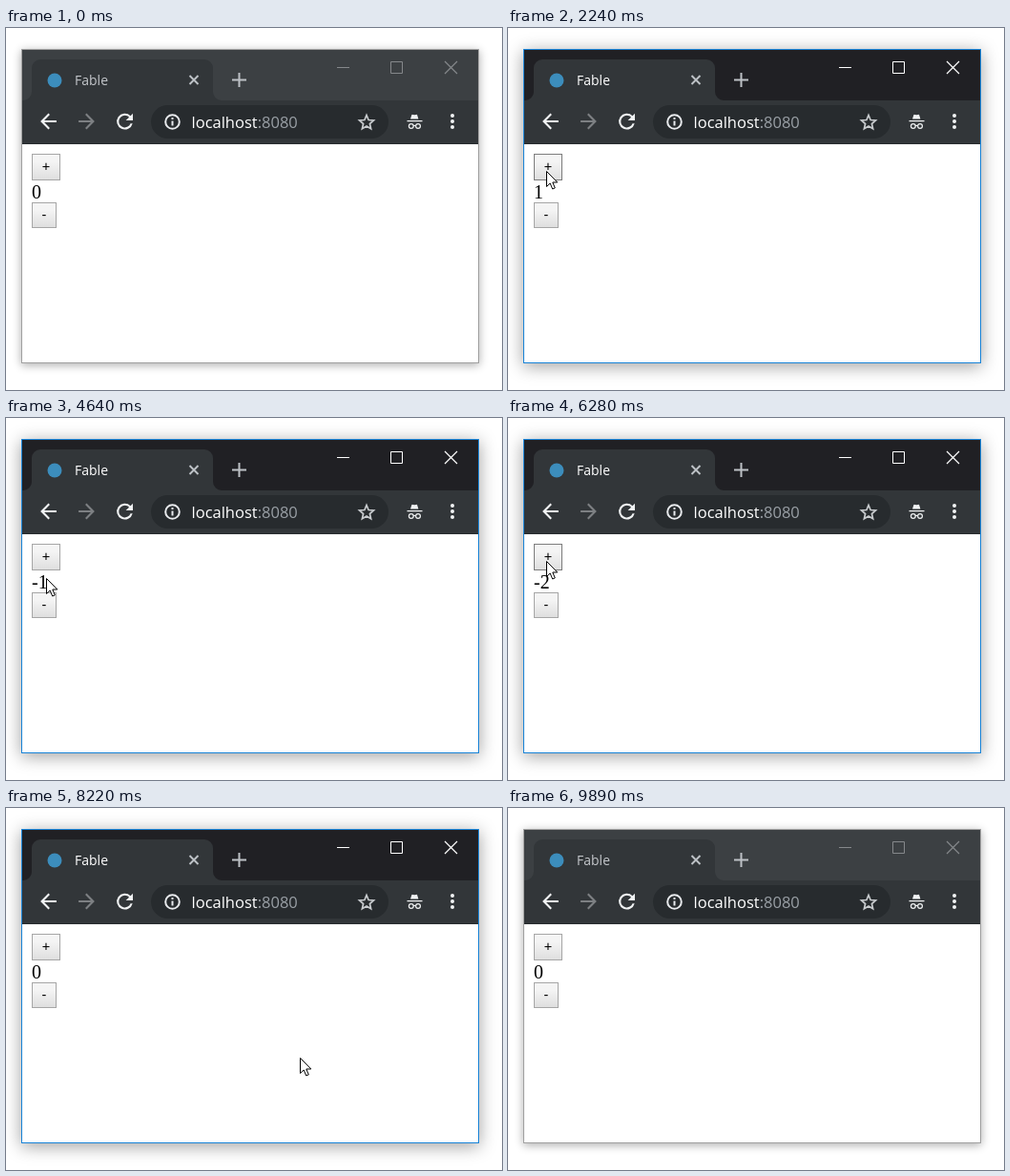
An HTML page for the animation above (9990 ms loop, 520 px wide and 380 px high).

```html
<!DOCTYPE html>
<html lang="en">
<head>
<meta charset="utf-8">
<title>Counter</title>
<style>
html, body { margin: 0; width: 100%; height: 100%; overflow: hidden; background: #fff; }
body { --frame: #3c4043; --edge: #a0a0a0; --ctl: #85888b; --label: #c3c6ca; --shadow: 0 2px 9px rgba(0,0,0,.33); }
body.active { --frame: #202024; --edge: #1883d7; --ctl: #fff; --label: #fff; --shadow: 0 3px 17px rgba(0,0,0,.38); }
#shadow { position: absolute; left: 16px; top: 22px; width: 480px; height: 330px; box-shadow: var(--shadow); }
svg { position: absolute; left: 0; top: 0; }
.ui { font-family: "Open Sans", "Noto Sans", sans-serif; }
.line { fill: none; stroke-width: 2; }
.thin { fill: none; stroke-width: 1.2; }
.button rect { fill: url(#face); stroke: #a6a6a6; }
.button.hover rect { stroke: #7c7c7c; }
.button.pressed rect { fill: #e2e2e2; }
.button text { font: 14.5px Arial, "Liberation Sans", sans-serif; text-anchor: middle; }
#count { font: 20px "Times New Roman", "Liberation Serif", serif; }
.cursor { fill: #fff; stroke: #000; }
</style>
</head>
<body>
<div id="shadow"></div>
<svg width="520" height="380" viewBox="0 0 520 380">
  <defs>
    <linearGradient id="face" x2="0" y2="1">
      <stop offset=".3" stop-color="#f4f4f4"/><stop offset="1" stop-color="#dedede"/>
    </linearGradient>
    <path id="back" d="M8-1H-4.200l5.600-5.600L0-8l-8 8 8 8 1.400-1.400L-4.200 1H8z"/>
  </defs>

  <path fill="#fff" d="M16 22h480v330H16z"/>
  <path fill="var(--frame)" d="M16 22h480v54H16z"/>
  <path fill="#323639" d="M16 76h480v46H16zM18 76A9 9 0 0 0 27 67V42A9 9 0 0 1 36 33H208A9 9 0 0 1 217 42V67A9 9 0 0 0 226 76z"/>
  <path fill="#272b2e" d="M16 121h480v1H16z"/>

  <!-- tab strip and window controls -->
  <circle cx="51" cy="55" r="7.5" fill="#3c8dbc"/>
  <text class="ui" x="72" y="60" font-size="14" fill="var(--label)">Fable</text>
  <path class="line" stroke="#bdc1c6" d="M192.500 50l9 9m0-9l-9 9"/>
  <path class="line" stroke="#bdc1c6" d="M237 54.500h15m-7.500-7.500v15"/>
  <path class="line" style="stroke-width:1" stroke="var(--ctl)" d="M347 41.500h13M403.500 35.500h12v12h-12z"/>
  <path class="thin" stroke="var(--ctl)" d="M460 35l13 13m0-13l-13 13"/>

  <!-- toolbar -->
  <use href="#back" fill="#f1f3f4" transform="translate(44.500 98) scale(1.050)"/>
  <use href="#back" fill="#7d8083" transform="translate(84.500 98) scale(-1.050 1.050)"/>
  <path fill="#f1f3f4" transform="translate(112 85.500) scale(1.050)" d="M17.650 6.350A8 8 0 1 0 19.730 14h-2.080A6 6 0 1 1 12 6c1.660 0 3.140.690 4.220 1.780L13 11h7V4z"/>
  <rect x="152" y="81" width="249" height="35" rx="17.5" fill="#272b2e"/>
  <circle class="line" cx="174.500" cy="98.500" r="7.300" stroke="#e8eaed"/>
  <path fill="#e8eaed" d="M173.500 94h2v2h-2zM173.500 97.500h2v5h-2z"/>
  <text class="ui" x="194.500" y="105" font-size="16.5" fill="#fff">localhost<tspan fill="#9aa0a6">:8080</tspan></text>
  <path class="line" stroke="#c8cbce" style="stroke-width:1.700" d="M378 91.500l2.100 5 5.400.500-4.100 3.500 1.200 5.300-4.600-2.800-4.600 2.800 1.200-5.300-4.100-3.500 5.400-.500z"/>
  <g fill="#f1f3f4">
    <path d="M424 95.500l1.300-4.200q.4-.8 1.200-.4l1.700.4 1.700-.4q.8-.4 1.200.4l1.300 4.200zM420.500 97h16v1.200h-16z"/>
    <circle cx="468" cy="92" r="2"/><circle cx="468" cy="98" r="2"/><circle cx="468" cy="104" r="2"/>
  </g>
  <g class="thin" stroke="#f1f3f4">
    <circle cx="424.800" cy="103" r="2.400"/><circle cx="432" cy="103" r="2.400"/><path d="M427 102.500h2.500"/>
  </g>

  <!-- page -->
  <g class="button" id="plus"><rect x="27.500" y="132.500" width="29" height="27"/><text x="42" y="149.500">+</text></g>
  <text id="count" x="27" y="178.500"></text>
  <g class="button" id="minus"><rect x="27.500" y="183.500" width="25" height="26"/><text x="40" y="200.500">-</text></g>
  <rect x="16.500" y="22.500" width="479" height="329" fill="none" stroke="var(--edge)"/>

  <g id="pointer">
    <path class="cursor" id="arrow" d="M.5.500v16l3.700-3.500 2.500 6 2.600-1.100-2.500-5.900h5z"/>
    <path class="cursor" id="resize" d="M0-11l4 5H1.500V6H4L0 11-4 6h2.500V-6H-4z"/>
  </g>
</svg>
<script>
const LOOP = 9990;
const $ = id => document.getElementById(id);

const plus = [40, 150], minus = [44, 191];
const entry = [293, 359], leftEdge = [16, 198], page = [303, 259], bottomEdge = [461, 352], exit = [471, 360];

// pointer moves: start, end, destination
const moves = [
  [130, 1070, leftEdge], [1170, 1810, plus], [2300, 3200, minus], [4200, 5000, plus],
  [5190, 5450, minus], [5950, 6270, plus], [7180, 8090, page], [8190, 9100, bottomEdge], [9230, 9500, exit]
];
const clicks = [2030, 3560, 4010, 5030, 5500, 5830, 6420, 7180];

function pointerAt(t) {
  return moves.reduce((from, [start, end, to]) => {
    const k = Math.min(1, Math.max(0, (t - start) / (end - start)));
    return from.map((v, i) => v + (to[i] - v) * k);
  }, entry).map(Math.round);
}

function isOver(id, [x, y]) {
  const box = $(id).firstChild.getBBox();
  return x >= box.x && x <= box.x + box.width && y >= box.y && y <= box.y + box.height;
}

// each click adds or subtracts one, depending on the button under the pointer
function countAt(t) {
  return clicks.filter(time => t >= time + 100)
    .reduce((sum, time) => sum + (isOver("plus", pointerAt(time)) ? 1 : -1), 0);
}

function draw(t) {
  const [x, y] = pointerAt(t);
  const held = clicks.some(time => t >= time && t < time + 150);
  document.body.classList.toggle("active", t >= clicks[0] && t < 9790);
  $("count").textContent = countAt(t);

  for (const id of ["plus", "minus"]) {
    const over = isOver(id, [x, y]);
    $(id).classList.toggle("hover", over);
    $(id).classList.toggle("pressed", over && held);
  }

  const side = x < 20, resizing = side || Math.abs(y - 352) < 5;
  $("pointer").style.display = t >= moves[0][0] && t < 9520 ? "" : "none";
  $("pointer").setAttribute("transform", `translate(${x} ${y})`);
  $("arrow").style.display = resizing ? "none" : "";
  $("resize").style.display = resizing ? "" : "none";
  $("resize").setAttribute("transform", `translate(.5 .5) rotate(${side ? 90 : 0})`);
}

const begin = performance.now();
function tick() {
  draw((performance.now() - begin) % LOOP);
  requestAnimationFrame(tick);
}
tick();
</script>
</body>
</html>
```
